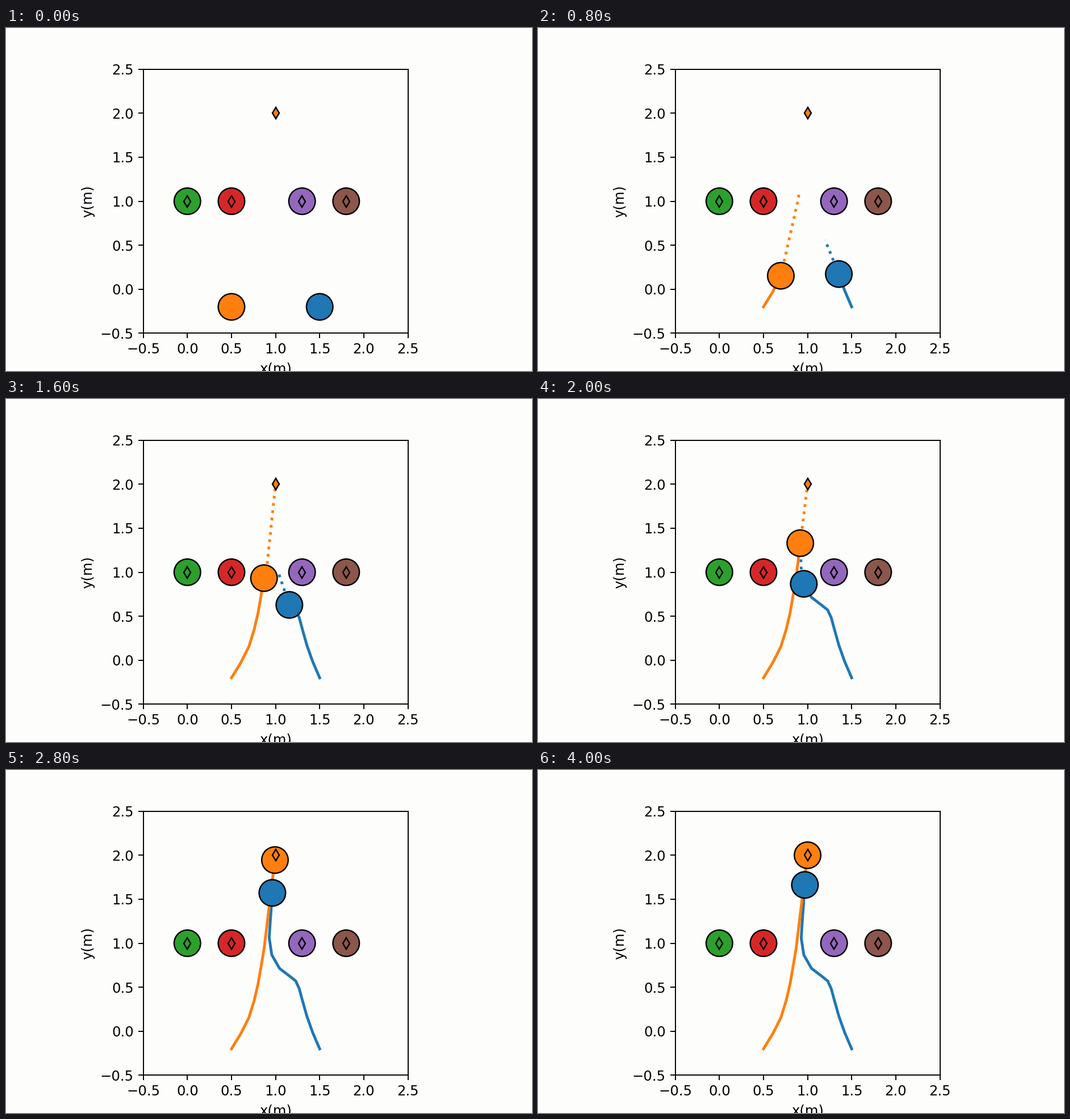
Animation, 926 px wide and 605 px high, one loop 4200 ms. Source, as a matplotlib script:

```python
import matplotlib.pyplot as plt
import numpy as np
from matplotlib.animation import FuncAnimation
from matplotlib.patches import Circle

W, H, DPI = 926, 605, 128
PT = 175 / DPI  # size of one drawing point
FRAMES, STEP_MS = 21, 200
RADIUS = 0.15
CRUISE, BRAKING = 0.2, 0.55  # metres per step, share of the remaining way
PAPER = "#fdfdfc"
PARKED = [(0, "tab:green"), (0.5, "tab:red"), (1.3, "tab:purple"), (1.8, "tab:brown")]

plt.rcParams.update({
    "font.family": "DejaVu Sans",
    "font.size": 10 * PT,
    "axes.linewidth": 0.8 * PT,
    "axes.labelpad": 4 * PT,
    "lines.linewidth": 2 * PT,
    "lines.markersize": 6 * PT,
    "lines.markeredgewidth": PT,
    "patch.linewidth": PT,
})

fig = plt.figure(figsize=(W / DPI, H / DPI), dpi=DPI, facecolor=PAPER)
ax = fig.add_subplot(aspect="equal", facecolor=PAPER)
ticks = np.linspace(-0.5, 2.5, 7)
ax.set(xlim=(-0.5, 2.5), ylim=(-0.5, 2.5), xticks=ticks, yticks=ticks,
       xlabel="x(m)", ylabel="y(m)")
ax.tick_params(length=3.5 * PT, width=0.8 * PT, pad=3.5 * PT)


def add_disc(center, color):
    return ax.add_patch(Circle(center, RADIUS, fc=color, ec="black", zorder=3))


def add_goal(center, color):
    ax.plot(*center, "d", color=color, mec="black", zorder=4)


def drive(route, slowdown):
    """Positions per step: speed up, cruise, then brake towards the route's end."""
    route = np.array(route)
    arc = np.append(0, np.cumsum(np.hypot(*np.diff(route, axis=0).T)))
    gone = [0.0]
    for step in range(1, FRAMES):
        speed = CRUISE * min(1, (step / 3.7) ** 2) * slowdown(step)
        gone.append(gone[-1] + min(speed, BRAKING * (arc[-1] - gone[-1])))
    return np.column_stack([np.interp(gone, arc, axis) for axis in route.T])


class Robot:
    def __init__(self, color, route, aims, gap, slowdown=lambda step: 1):
        self.path = drive(route, slowdown)
        self.aims, self.gap = np.array(aims).T, gap
        self.trail, = ax.plot([], [], color=color, zorder=2)
        self.plan, = ax.plot([], [], ":", color=color, zorder=2)
        self.disc = add_disc(route[0], color)

    def planned(self, step):
        """Straight to the current aim, by way of the gap if it lies between."""
        here = self.path[step]
        if step == 0:
            return [here]
        steps, xs, ys = self.aims
        aim = np.interp(step, steps, xs), np.interp(step, steps, ys)
        via = [self.gap] if here[1] < self.gap[1] < aim[1] else []
        return [here, *via, aim]

    def show(self, step):
        self.disc.center = self.path[step]
        self.trail.set_data(*self.path[:step + 1].T)
        self.plan.set_data(*zip(*self.planned(step)))
        return self.trail, self.plan, self.disc


def yielding(step):
    return 1 - 0.55 * np.exp(-((step - 7.5) / 1.9) ** 2)


# Aims are (step, x, y)
blue = Robot(
    "tab:blue",
    route=[(1.5, -0.2), (1.41, 0.01), (1.345, 0.2), (1.26, 0.514), (1.21, 0.604),
           (1.125, 0.643), (1.016, 0.739), (0.951, 0.881), (0.927, 1.068),
           (0.97, 1.663)],
    aims=[(1, 1.33, 0.22), (2, 1.24, 0.443), (6, 1.157, 0.675), (10, 0.92, 1.28),
          (12, 0.96, 1.525), (16, 0.97, 1.663)],
    gap=(0.927, 1.05),
    slowdown=yielding,
)
orange = Robot(
    "tab:orange",
    route=[(0.5, -0.2), (0.61, -0.02), (0.7, 0.16), (0.761, 0.36), (0.805, 0.553),
           (0.871, 0.945), (0.966, 1.738), (1, 2)],
    aims=[(1, 0.86, 0.26), (2, 0.89, 0.536), (6, 0.9, 1.638), (8, 1, 2)],
    gap=(0.9, 1.05),
)

for x, color in PARKED:
    add_disc((x, 1), color)
    add_goal((x, 1), color)
add_goal((1, 2), "tab:orange")


def update(step):
    return [*blue.show(step), *orange.show(step)]


anim = FuncAnimation(fig, update, frames=FRAMES, interval=STEP_MS,
                     repeat=True, repeat_delay=0, blit=False)
plt.show()
```
